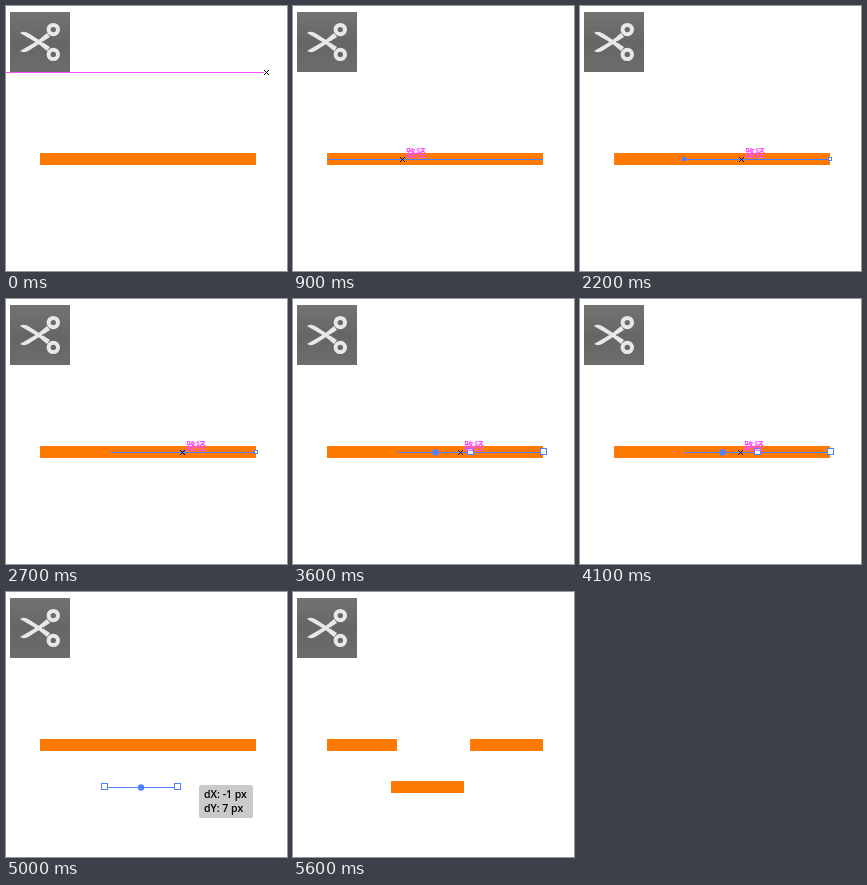
Animation, 281 px wide and 265 px high, one loop 6.4 s. Source, as an HTML page with a canvas:

```html
<!DOCTYPE html>
<html lang="zh">
<head>
<meta charset="utf-8">
<style>
  html, body { margin: 0; width: 100%; height: 100%; overflow: hidden; background: #fff; }
  canvas { display: block; }
</style>
</head>
<body>
<canvas id="stage" width="281" height="265"></canvas>
<script>
const ctx = document.getElementById('stage').getContext('2d');
const LOOP = 6400, STEP = 100;
const ORANGE = '#ff7a00', BLUE = '#4f80ff', MAGENTA = '#ff4fff', LIGHT = '#e8e8e8';
const LEFT = 34, CUT_A = 104, CUT_B = 177, RIGHT = 250;
const MID_Y = 153, SCALE = 6;

// Moments of the story
const HOVER = 900, SNIP_A = 1600, LEAVE = 2100, SNIP_B = 2700;
const PICK = 3600, GRAB = 4200, PRESS = 4500, DRAG = 4700, DROP = 5100, CLEAR = 5600;

// Each leg of the cursor starts at a time and ends at a point
const start = { x: 260, y: 66 };
const legs = [
  { at: 100, steps: 3, x: 142, y: 112 },
  { at: 700, steps: 5, x: CUT_A, y: MID_Y },
  { at: LEAVE, steps: 4, x: CUT_B - 1, y: MID_Y },
  { at: 3200, steps: 2, x: 167, y: MID_Y },
  { at: 4000, steps: 4, x: 158, y: MID_Y }
];

const easeOut = k => 1 - (1 - k) ** 2.25;

function cursorAt(t) {
  let { x, y } = start;
  for (const leg of legs) {
    if (t < leg.at) break;
    const p = easeOut(Math.min(1, ((t - leg.at) / STEP + 1) / leg.steps));
    x += (leg.x - x) * p;
    y += (leg.y - y) * p;
  }
  // The pointer snaps to the path when it touches the bar
  if (Math.abs(y - MID_Y) < 6) y = MID_Y;
  return { x: Math.round(x), y: Math.round(y) };
}

function rect(x, y, w, h, color) {
  ctx.fillStyle = color;
  ctx.fillRect(x, y, w, h);
}

function bar(x0, x1, y = MID_Y) {
  rect(x0, y - 6, x1 - x0, 12, ORANGE);
}

function trace(x0, x1, y = MID_Y) {
  rect(x0, y, x1 - x0, 1, BLUE);
}

function square(x, y, size, fill = '#fff') {
  const left = x - (size >> 1), top = y - (size >> 1);
  rect(left, top, size, size, BLUE);
  rect(left + 1, top + 1, size - 2, size - 2, fill);
}

const anchor = (x, fill) => square(x, MID_Y, 4, fill);

function dot(x, y) {
  ctx.fillStyle = BLUE;
  ctx.beginPath();
  ctx.arc(x + 0.5, y + 0.5, 3.2, 0, Math.PI * 2);
  ctx.fill();
}

function handles(x0, x1, y, center = (x0 + x1) / 2) {
  square(x0, y - 1, 7);
  square(x1, y - 1, 7);
  dot(center, y);
}

function cursor({ x, y }) {
  for (let i = -2; i <= 2; i++) {
    rect(x + i, y + i, 1, 1, '#000');
    rect(x + i, y - i, 1, 1, '#000');
  }
}

function label({ x, y }) {
  ctx.font = 'bold 10px "Noto Sans CJK SC", "Noto Sans CJK", sans-serif';
  ctx.fillStyle = MAGENTA;
  ctx.fillText('路径', x + 4, y - 2);
}

function tooltip(x, y, dx, dy) {
  ctx.fillStyle = '#cacaca';
  ctx.beginPath();
  ctx.roundRect(x, y, 54, 33, 2);
  ctx.fill();
  ctx.font = '600 10.5px "Open Sans", sans-serif';
  ctx.fillStyle = '#000';
  ctx.fillText(`dX: ${dx} px`, x + 5, y + 13);
  ctx.fillText(`dY: ${dy} px`, x + 5, y + 27);
}

function icon() {
  const shade = ctx.createLinearGradient(0, 6, 0, 66);
  shade.addColorStop(0, '#737373');
  shade.addColorStop(0.5, '#666');
  shade.addColorStop(1, '#6c6c6c');
  rect(4, 6, 60, 60, shade);

  ctx.save();
  ctx.translate(0, 36);
  ctx.filter = 'blur(0.6px)';
  ctx.strokeStyle = ctx.fillStyle = LIGHT;
  ctx.lineWidth = 4;
  for (const side of [-1, 1]) {
    ctx.beginPath();
    ctx.moveTo(14, side * 9);
    ctx.quadraticCurveTo(18, side * 11.5, 23, side * 8.5);
    ctx.lineTo(44, -side * 5);
    ctx.lineTo(41, -side * 9);
    ctx.lineTo(32, -side * 1.5);
    ctx.closePath();
    ctx.fill();
    ctx.beginPath();
    ctx.arc(47.3, side * 12.4, 4.7, 0, Math.PI * 2);
    ctx.stroke();
  }
  ctx.restore();
  rect(36, 35, 2, 2, '#888');
}

function draw(t) {
  const during = (a, b) => t >= a && t < b;
  const dropped = t >= DROP;
  rect(0, 0, 281, 265, '#fff');
  icon();

  // Drag offset in document pixels
  const dx = t < 5000 ? 0 : -1;
  const dy = t < DRAG + STEP ? 3 : 7;
  const x0 = CUT_A + dx * SCALE, x1 = CUT_B + dx * SCALE, y = MID_Y + dy * SCALE;

  bar(LEFT, dropped ? CUT_A : RIGHT);
  if (dropped) {
    bar(CUT_B, RIGHT);
    bar(x0, x1, y);
  }

  // Hovered and selected paths
  if (during(HOVER, LEAVE)) trace(LEFT, RIGHT);
  if (during(LEAVE, GRAB)) trace(CUT_A, RIGHT);
  if (during(GRAB, DRAG)) trace(CUT_A, CUT_B);

  // Anchors made by the two cuts
  if (during(SNIP_A, SNIP_B - STEP)) anchor(CUT_A, BLUE);
  if (during(SNIP_B, PICK)) anchor(CUT_B, BLUE);
  if (during(SNIP_A, PICK)) anchor(RIGHT);

  // Picking and dragging the middle piece
  if (during(PICK, GRAB)) handles(CUT_B, RIGHT, MID_Y, (LEFT + RIGHT) / 2);
  if (during(GRAB, PRESS)) handles(CUT_A, CUT_B, MID_Y);
  if (during(DRAG, CLEAR)) {
    trace(x0, x1, y);
    handles(x0, x1, y);
    if (!dropped) tooltip(193, y - 2, dx, dy);
  }

  if (t < DRAG) {
    const pos = cursorAt(t);
    const guided = during(300, 700);
    if (t < STEP || guided) rect(0, pos.y, pos.x - 2, 1, MAGENTA);
    if (guided) rect(pos.x, pos.y + 3, 1, MID_Y - pos.y - 3, MAGENTA);
    if (t >= HOVER && !during(SNIP_A - STEP, SNIP_A + STEP)) label(pos);
    cursor(pos);
  }
}

function tick() {
  const t = performance.now() % LOOP;
  draw(Math.floor(t / STEP) * STEP);
  requestAnimationFrame(tick);
}
tick();
</script>
</body>
</html>
```
